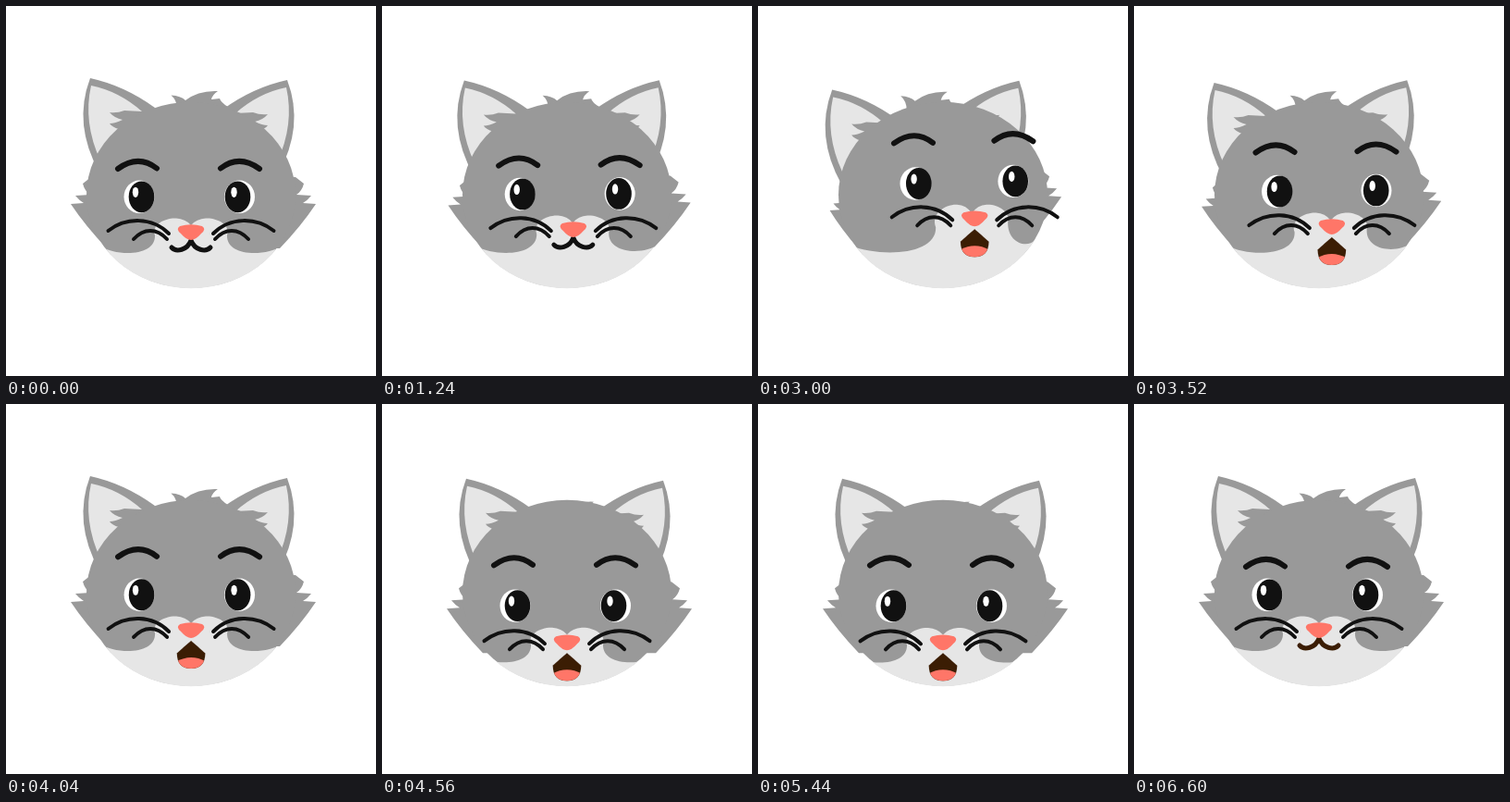
These frames come from a looping animation (400x400 px, 6640 ms). An HTML page with a canvas:

```html
<!DOCTYPE html>
<html lang="en">
<head>
<meta charset="utf-8">
<title>Cat</title>
<style>
html, body { margin: 0; width: 100%; height: 100%; overflow: hidden; background: #fff; }
canvas { display: block; width: 400px; height: 400px; }
</style>
</head>
<body>
<canvas id="stage"></canvas>
<script>
const LOOP = 6640;
const FUR = '#999999', PALE = '#e6e6e6', INK = '#111111', PINK = '#ff7668', BROWN = '#3b1d04';
const canvas = document.getElementById('stage');
const ctx = canvas.getContext('2d');
const ratio = window.devicePixelRatio || 1;
canvas.width = canvas.height = 400 * ratio;

const clamp = v => Math.min(1, Math.max(0, v));
const lerp = (a, b, p) => a + (b - a) * p;

// Eased passage from 0 to 1 between two times
function ease(time, from, to) {
  const p = clamp((time - from) / (to - from));
  return p * p * (3 - 2 * p);
}

function fill(path, color) {
  ctx.fillStyle = color;
  ctx.fill(path);
}

function stroke(path, width, color = INK) {
  ctx.strokeStyle = color;
  ctx.lineWidth = width;
  ctx.stroke(path);
}

function ellipse(x, y, rx, ry) {
  const path = new Path2D();
  path.ellipse(x, y, rx, ry, 0, 0, Math.PI * 2);
  return path;
}

function at(x, y, draw) {
  ctx.save();
  ctx.translate(x, y);
  draw();
  ctx.restore();
}

// Mirrors a drawing so that x becomes axis - x.
function flip(axis, draw) {
  at(axis, 0, () => {
    ctx.scale(-1, 1);
    draw();
  });
}

const face = ellipse(200, 204.3, 113, 100.5);
const paleFace = ellipse(200, 204.3, 113.3, 100.9);
const tuft = new Path2D('M185 112 Q185 102 178.5 96.5 Q189 97 194 102 Q208 91 229 92 Q223 96 222 101 L231 100 Q232 104 240 109 V125 H185Z');
const cheek = new Path2D('M92 185 L83 192 Q85 200 91 204 L75 205 Q79 210 84 213 L70 214 Q86 238 109 262 H140 V185Z');
const ear = new Path2D('M91 78 Q128 86 161 110 L150 150 L101 180 Q72 128 91 78Z');
const innerEar = new Path2D('M92 86 Q122 92 147 114 L128 113 Q120 116 112 115 Q117 121 126 123 Q118 127 112 127 Q115 131 122 133 L124 140 L102 167 Q83 126 92 86Z');
const brow = new Path2D('M121 176 Q143 160 163 175.5');
const whiskers = new Path2D('M110.5 243 C130 228 158 228 176 246 M138 252 C149 240 163 240 174 252');
const nose = new Path2D('M188 238 Q200 234.5 212 238 Q217 241 211 246 Q205 253 200 253 Q195 253 189 246 Q183 241 188 238Z');
const tongue = new Path2D('M180 281 Q200 267 220 281 V296 H180Z');

// Key points of half the muzzle outline: jaw, cheek patch, bulge, dip above the nose
const HALF = [[100, 259], [122, 272], [162, 270], [161, 248], [157, 237], [171, 229], [184, 229.5], [194, 230], [200, 237]];

function muzzle(turn, down) {
  // Points follow the nose more the closer they lie to it.
  const place = right => ([x, y]) => {
    const near = clamp((x - 100) / 60);
    const lift = right ? lerp(0.4, 1, near) : near * clamp((272 - y) / 40);
    return [(right ? 400 - x : x) + 36 * turn * near, y - 17 * turn * lift + 13.5 * down];
  };
  const left = HALF.map(place(false)), right = HALF.map(place(true)).reverse();
  const path = new Path2D();
  path.moveTo(...left[0]);
  path.bezierCurveTo(...left[1], ...left[2], ...left[3]);
  path.bezierCurveTo(...left[4], ...left[5], ...left[6]);
  path.quadraticCurveTo(...left[7], ...left[8]);
  path.quadraticCurveTo(...right[1], ...right[2]);
  path.bezierCurveTo(...right[3], ...right[4], ...right[5]);
  path.bezierCurveTo(...right[6], ...right[7], ...right[8]);
  path.lineTo(320, 330);
  path.lineTo(80, 330);
  path.closePath();
  return path;
}

// Both lips share a W when closed; the lower one drops into a bowl.
function mouth(open, color) {
  const m = (closed, opened) => lerp(closed, opened, open);
  const side = m(21, 15.3), sideY = m(261, 269.5);
  const path = new Path2D();
  path.moveTo(200 - side, sideY);
  const lip = (outX, outY, midX, midY, peak, dir) => {
    path.bezierCurveTo(200 - dir * outX, outY, 200 - dir * midX, midY, 200, peak);
    path.bezierCurveTo(200 + dir * midX, midY, 200 + dir * outX, outY, 200 + dir * side, sideY);
  };
  lip(m(16, 11), m(266.5, 265.5), 4, m(264, 259.5), m(253.5, 256), 1);
  lip(m(16, 15), m(266.5, 281), m(4, 10), m(264, 286), m(253.5, 286), -1);
  path.closePath();
  stroke(path, m(5, 0.1), color);
  fill(path, color);
  ctx.save();
  ctx.clip(path);
  if (open > 0) fill(tongue, PINK);
  ctx.restore();
}

function eye(white, pupil, shine, y) {
  fill(ellipse(white, y, 16.5, 17.7), '#fff');
  fill(ellipse(pupil, y, 13.8, 16.9), INK);
  fill(ellipse(shine, y - 5, 3.2, 5.6), '#fff');
}

function drawEar() {
  fill(ear, FUR);
  fill(innerEar, PALE);
}

function draw(time) {
  const turn = ease(time, 1040, 1800) - ease(time, 2680, 4080);
  const down = ease(time, 4040, 4680) - ease(time, 5320, 6020);
  const open = ease(time, 2090, 2370) - ease(time, 6020, 6300);

  ctx.setTransform(ratio, 0, 0, ratio, 0, 0);
  ctx.fillStyle = '#fff';
  ctx.fillRect(0, 0, 400, 400);
  ctx.lineCap = ctx.lineJoin = 'round';

  at(-28 * turn, turn + 15 * down, () => fill(tuft, FUR));
  at(105, 262 + 8 * down, () => {
    ctx.scale(1 - 0.25 * turn, 1 - 0.17 * turn);
    ctx.translate(-105, -262);
    fill(cheek, FUR);
  });
  at(-8 * turn, -9 * turn + 8 * down, () => flip(405, () => fill(cheek, FUR)));
  at(-12.5 * turn, 14.5 * turn + 3 * down, drawEar);
  at(-25 * turn, 2 + turn + 3 * down, () => flip(395, drawEar));

  fill(face, FUR);
  ctx.save();
  ctx.clip(muzzle(turn, down));
  fill(paleFace, PALE);
  ctx.restore();

  const eyeY = 206.3 + 13 * down;
  eye(144 + 30 * turn, 146.5 + 31.5 * turn, 140 + 33 * turn, eyeY - 16.5 * turn);
  eye(252.5 + 27 * turn, 250.5 + 32 * turn, 246.5 + 32 * turn, eyeY - 19.5 * turn);

  const browY = 10 * down - 10.7 * open;
  at(30 * turn, browY - 19.5 * turn, () => stroke(brow, 6));
  at(27 * turn, browY - 22 * turn, () => flip(395, () => stroke(brow, 6)));

  at(39.5 * turn, -17 * turn + 14.5 * down, () => {
    stroke(whiskers, 4);
    flip(400, () => stroke(whiskers, 4));
    mouth(open, time < 2090 ? INK : BROWN);
    fill(nose, PINK);
  });
}

const start = performance.now();
function tick() {
  draw((performance.now() - start) % LOOP);
  requestAnimationFrame(tick);
}
tick();
</script>
</body>
</html>
```
